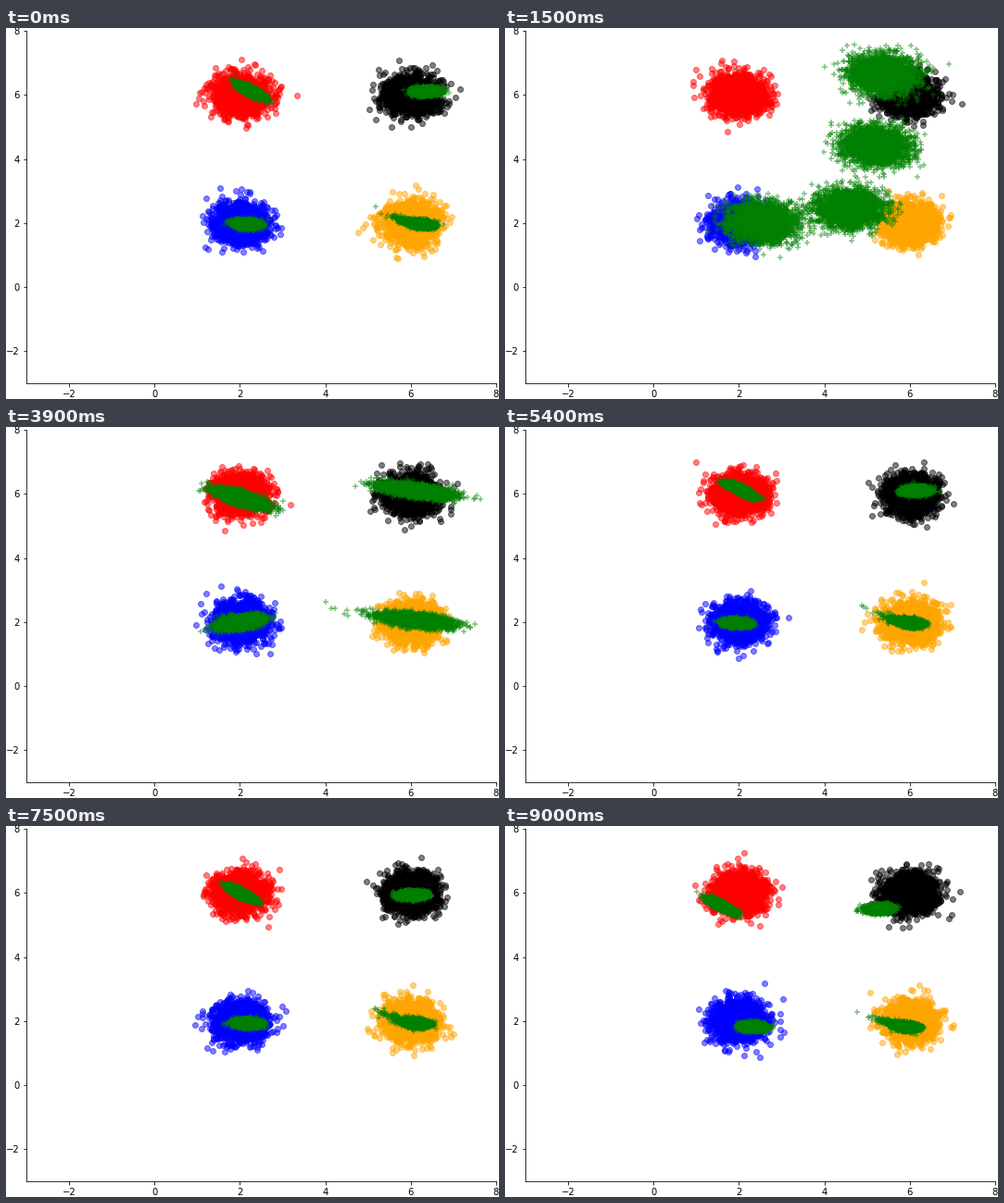
Recreate the animation shown at these times as a matplotlib script. Size 532x401 px, loop 9300 ms.

```python
import numpy as np
import matplotlib.pyplot as plt
from matplotlib.animation import FuncAnimation

W, H, DPI = 532, 401, 72
FRAMES, INTERVAL = 31, 300
N_REAL, N_FAKE = 1500, 3000
SPREAD = 0.31

CLUSTERS = [((2, 2), "blue"), ((2, 6), "red"), ((6, 2), "orange"), ((6, 6), "black")]

# The blobs leave along a line, turn, arrive, settle and finally drift off
TIMES = [1, 2, 7, 11, 16, 23, 30]
LINE = np.linspace((2.07, 1.65), (4.05, 6.55), 4)
TURN = np.array([(2.9, 2.25), (5.8, 1.87), (6.4, 4.1), (6.25, 6.7)])
ARRIVE = np.array([(1.85, 2.0), (6.05, 2.1), (5.9, 6.1), (1.8, 5.7)])
HOME = np.array([(2.05, 1.97), (6.1, 1.97), (6.25, 6.1), (2.15, 6.12)])
DRIFT = np.array([(2.4, 1.82), (5.95, 1.83), (5.35, 5.5), (1.65, 5.6)])
PATHS = np.stack([LINE / 2, LINE, TURN, ARRIVE, HOME, HOME, DRIFT])

SHAPE_TIMES = [2, 7, 11, 18]
WIDE = [.28, .47, .50, .34]
LEAN = [.28, -.16, -.25, -.27]
TILT = [-.05, -.08, .03, -.62]


def blob(rng, t, i):
    """Tilted Gaussian; the second blob also trails a curved tail."""
    cx, cy = (np.interp(t, TIMES, PATHS[:, i, k]) for k in (0, 1))
    cx += 0.12 * np.sin(2 * np.pi * (t - 20) / 11) * (t > 7)
    width = np.interp(t, SHAPE_TIMES, [.38, .38, WIDE[i], .145])
    thick = np.interp(t, SHAPE_TIMES, [.36, .25, .11, .06])
    slope = np.interp(t, SHAPE_TIMES, [.35, -.3, LEAN[i], TILT[i]])
    tail = np.interp(t, SHAPE_TIMES, [0, 0, .3, 1]) * (i == 1)

    u, v = rng.standard_normal((2, N_FAKE))
    drag = tail * np.maximum(-u, 0) ** 3
    x = cx + width * (u - .08 * drag)
    y = cy + slope * width * u + thick * v + .01 * drag
    return np.column_stack([x, y])


plt.rcParams["font.family"] = "DejaVu Sans"
fig = plt.figure(figsize=(W / DPI, H / DPI), dpi=DPI, facecolor="white")
ax = fig.add_axes([22 / W, 17 / H, 507 / W, 381 / H])
ax.set(xlim=(-3, 8), ylim=(-3, 8), xticks=range(-2, 9, 2), yticks=range(-2, 9, 2))
ax.spines[["top", "right"]].set_visible(False)

real = [ax.scatter([], [], s=36, c=color, alpha=0.5) for _, color in CLUSTERS]
fake = ax.scatter([], [], s=36, c="green", marker="+", alpha=0.5)


def update(frame):
    rng = np.random.default_rng(100 + frame)
    t = frame or 22  # the loop opens on the settled state
    for dots, (centre, _) in zip(real, CLUSTERS):
        dots.set_offsets(rng.normal(centre, SPREAD, (N_REAL, 2)))
    fake.set_offsets(np.vstack([blob(rng, t, i) for i in range(len(HOME))]))
    return [*real, fake]


anim = FuncAnimation(fig, update, frames=FRAMES, interval=INTERVAL,
                     repeat=True, repeat_delay=0)
plt.show()
```
